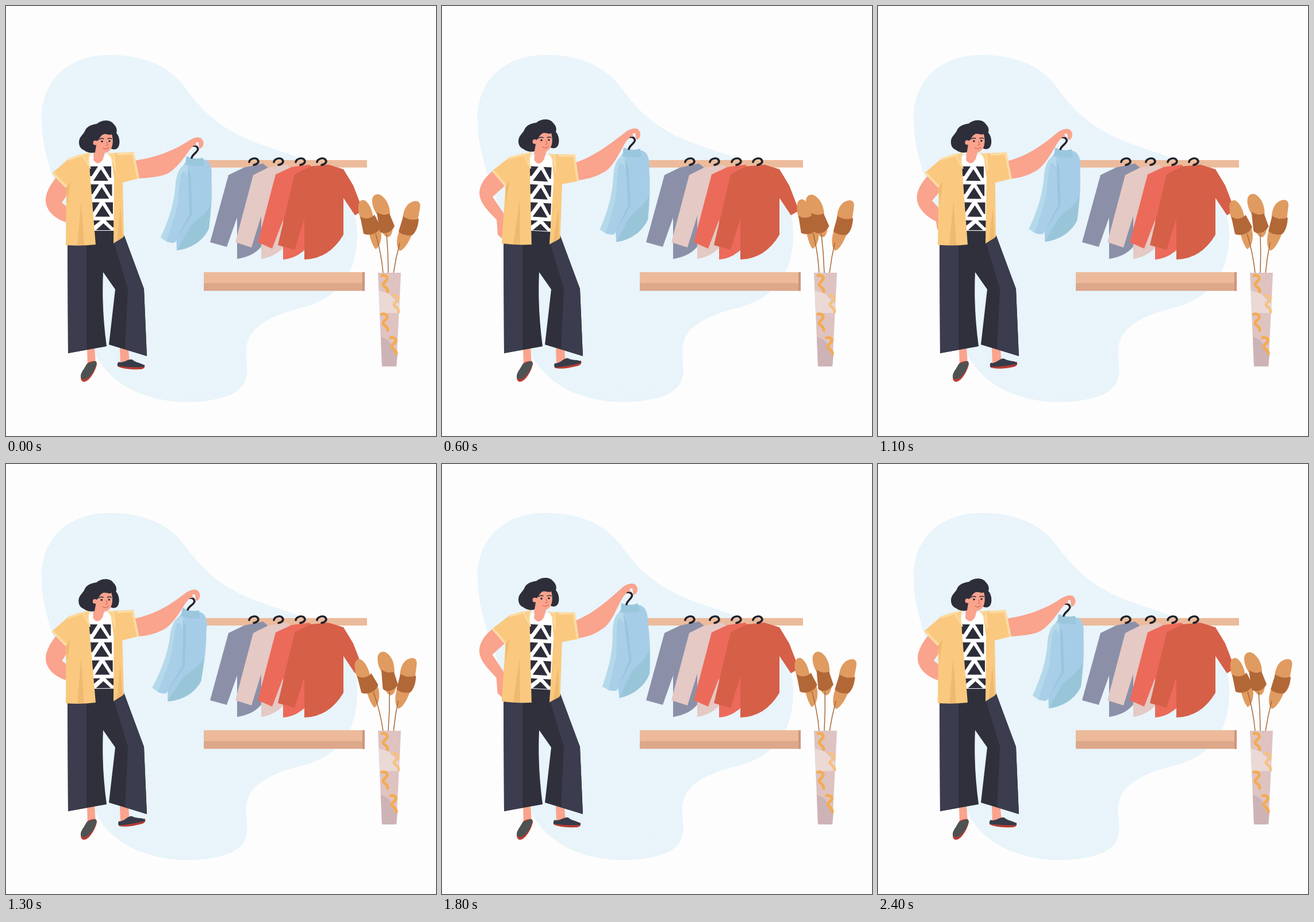
Write an HTML page that moves like this. It is 748x748 px and loops after 2450 ms.

```html
<!DOCTYPE html>
<html lang="en">
<head>
<meta charset="utf-8">
<title>Choosing a shirt</title>
<style>
html, body { margin: 0; width: 100%; height: 100%; overflow: hidden; background: #fdfdfd; }
svg { display: block; width: 100vw; height: 100vh; }
.skin { fill: #faa38d; }
.ink { fill: #2d2e3a; }
.line { fill: none; stroke-linecap: round; stroke-linejoin: round; }
.trim { fill: none; stroke: #fcdca3; stroke-width: 4; }
.fold { fill: #efba6f; }
.leaf { fill: #e09b60; }
.band { fill: #b26737; }
.stem { fill: none; stroke: #a5693a; stroke-width: 1.5; }
</style>
</head>
<body>
<svg viewBox="0 0 748 748">
  <defs>
    <linearGradient id="blob" x1=".25" y1="0" x2=".45" y2="1">
      <stop offset="0" stop-color="#e9f4fb"/><stop offset="1" stop-color="#e8f4fa"/>
    </linearGradient>
    <path id="hook" class="line" stroke="#22232a" stroke-width="3.6" d="M-8 2C-7 -4 2 -6 6 -3C10 1 8 5 0 7"/>
    <path id="curl" class="line" stroke-width="5" d="M-5 -14C0 -16 5 -12 4 -8C3 -4 -3 -2 -3 2C-2 6 5 6 5 14"/>
  </defs>
  <rect width="748" height="748" fill="#fdfdfd"/>
  <path fill="url(#blob)" d="M62 195C62 130 108 85 182 85C240 86 284 104 313 144C372 226 430 235 505 262C570 284 612 335 611 398C610 470 576 508 518 524C466 537 418 556 418 600C418 628 424 642 412 660C398 681 352 689 316 689C235 688 178 655 152 600C125 540 126 450 108 380C92 320 62 265 62 195Z"/>

  <rect x="344" y="268" width="284" height="13" fill="#ecbb9c"/>
  <rect x="344" y="463" width="280" height="19" fill="#ecba9b"/>
  <rect x="344" y="482" width="280" height="13.5" fill="#dda78b"/>
  <path fill="#cc967c" d="M620 463h4v32.5h-4V482Z"/>
  <g id="rack">
    <path fill="#8b90a8" d="M387 294L414 281L428 278L447 274L458 283V400L442 421Q428 436 402 440V368L384 419L355 411Z"/>
    <path fill="#e4c9c4" d="M430 294L456 281L490 276L500 290V400L486 416Q470 436 444 440V365L427 420L399 411Z"/>
    <path fill="#ec6a5a" d="M469 293L497 280L528 276L540 290V400L524 420Q506 439 482 441V372L463 422L438 411Z"/>
    <path fill="#d65f48" d="M502 293L529 279L561 276L587 284L604 312L621 356L607 364L587 334V398Q562 440 519 441V370L502 424L473 416Z"/>
  </g>

  <g id="leaf0">
    <path class="leaf" d="M613 352C612 340 618 336 624 338C632 343 637 355 639 368L618 373Q613 362 613 352ZM631 394L650 384C656 400 652 418 643 423C637 416 634 405 631 394Z"/>
    <path class="band" d="M616 366C625 372 635 370 641 363L652 384C646 398 630 400 622 396Z"/>
    <path class="stem" d="M656 465Q653 430 643 396"/>
  </g>
  <g id="leaf1">
    <path class="leaf" d="M637 341C636 330 643 326 650 328C662 334 668 348 668 363L645 362Q638 352 637 341ZM652 389L673 386C672 397 668 403 663 402Q657 400 652 389Z"/>
    <path class="band" d="M645 359C652 363 660 364 667 361L676 383C669 396 656 398 650 392Z"/>
    <path class="stem" d="M665 465Q665 430 662 396"/>
  </g>
  <g id="leaf2">
    <path class="leaf" d="M708 340C718 337 722 343 720 352L716 374L690 368C692 352 698 343 708 340ZM684 391C679 405 678 420 685 426C693 424 701 410 706 398Z"/>
    <path class="band" d="M691 366C700 372 710 373 718 370C717 385 712 395 706 399C695 400 686 396 683 392Z"/>
    <path class="stem" d="M674 465Q678 438 685 412"/>
  </g>
  <path fill="#dec3c1" d="M647 464H687L679 627H654Z"/>
  <path fill="#ead9d5" d="M648.5 495L666 500L685 520L683.6 534H650.5Z"/>
  <path fill="#ceb3b6" d="M652 575L664 581L681.5 602L679 627H654Z"/>
  <use href="#curl" x="659" y="483" stroke="#f4ab50"/>
  <use href="#curl" x="678" y="518" stroke="#f6c184"/>
  <use href="#curl" x="659" y="550" stroke="#f4ab50"/>
  <use href="#curl" x="674" y="591" stroke="#f4ab50"/>

  <path id="backArm" class="skin"/>
  <path class="skin" d="M141 595H154L156 622L142 628ZM198 595L213 598L215 620L199 622Z"/>
  <path fill="#b93b33" d="M142 621C151 616 159 617 158 623C156 634 146 652 137 653.5C129 655 128 643 134 636Z"/>
  <path fill="#4d5253" d="M141 622C149 621 154 615 157 619C158 629 146 648 137 649C127 650 129 640 135 632Z"/>
  <g id="foot">
    <path fill="#b93b33" d="M195 624H241Q243 632 232 632Q206 633 194 627Z"/>
    <path fill="#373b49" d="M196 619C204 623 215 611 221 616C228 622 241 621 241 628C225 629 208 628 194 626Q193 622 196 619Z"/>
  </g>
  <path fill="#2f303b" d="M107 408L150 387H198L206 400L240 492L245 609L179 589L190 493L169 463Q166 525 175 592L108 604Z"/>
  <path fill="#3b3c4d" d="M107 408H140V598L108 604ZM186 406L205 399L240 492L245 609L207 597L212 492Z"/>

  <g id="held">
    <path fill="#a6cde7" d="M312 272L345 267C357 270 359 285 357.500 302C359 330 357 360 353 387C345 405 325 422 297 425L296 400L300 290Z"/>
    <path fill="#99c5d9" d="M356 346C345 368 328 372 319 386L297 425C325 422 345 405 353 387Z"/>
    <path fill="#b4d9ea" d="M312 276C301 279 297 294 295 308C293 340 286 365 269 403L281 411L294 411L324 362L321 300Q320 280 312 276Z"/>
    <path fill="#a9cfe8" d="M306 288C299 310 302 340 295 360L279 409Q288 414 294 411L319 364L317 305Q316 288 306 288Z"/>
    <path fill="#98c6dc" d="M316 281Q322 290 322 310L324 362L294 411L319 362L317 305Z"/>
    <path fill="#9bc7dd" d="M314 261Q328 268 343 264L345 278Q326 281 312 275Z"/>
    <path class="line" stroke="#22232a" stroke-width="3.5" d="M319 247C322 241 333 242 334 249C333 255 325 257 323 264"/>
  </g>
  <path id="arm" class="skin"/>

  <g id="torso">
    <path fill="#fff" d="M143 262L188 257L191 391H153Z"/>
    <g id="print" class="ink"></g>
    <path class="skin" d="M153 248L173 250L169 266Q161 280 152 268Z"/>
    <path fill="#fac97f" d="M133 258L110 265L80 291L105 316L104 416Q130 418 156 415L145 278ZM182 256L222 254L231 300L203 307L205 401L187 413L188 300Z"/>
    <path class="fold" d="M124 416L131 338L136 416ZM105 316L112 305L107 345ZM193 409L199 350L203 403Z"/>
    <path class="trim" d="M81 290L105 315M109 267L133 259M194 258L221 256L230 300"/>
    <path fill="#fbd08b" stroke="#fcdca3" stroke-width="2" d="M133 259L146 255Q141 270 147 283ZM178 256L188 258L190 286Q188 268 178 256Z"/>
  </g>

  <g id="head">
    <path class="ink" d="M127 237C127 228 134 224 137 218C140 209 150 206 158 205C166 198 181 197 187 205C192 210 194 215 192 221C198 227 199 240 195 246C191 251 185 250 181 247L160 253C152 257 142 256 136 251C129 248 127 243 127 237Z"/>
    <circle class="skin" cx="155.500" cy="238" r="4"/>
    <path class="skin" d="M158 236C163 231 164 225 170 223C177 222 180 226 184 223C187 233 187 249 177 254C167 258 161 254 157 244Z"/>
    <path class="skin" d="M157 242L172 254L170 260H154Z"/>
    <g class="ink"><circle cx="167" cy="235.500" r="1.800"/><circle cx="180" cy="235" r="1.800"/></g>
    <path class="line" stroke="#2d2e3a" stroke-width="1.400" d="M162 232Q166 229 170 231M177 231Q181 229 184 231"/>
    <path class="line" stroke="#d9695c" stroke-width="1.200" d="M175 236L177 242L174 243M169 247Q174 251 179 246"/>
  </g>
</svg>
<script>
const LOOP = 2450, STEP = 50;
const times = [0, 600, 900, 1300, 1800, 2150, 2400, LOOP];
// Values at the first six times; every track returns to its first value.
const tracks = {
  lean:  [0, 1, .5, -.08, .97, .14],
  headX: [0, 6, 1, -.7, 6, .2],
  headY: [0, -2, -2, 1, -1.4, -.4],
  elbow: [0, 1, .8, -.03, 1.05, .15],
  handX: [0, 1.5, -4.5, -6, -3.5, -6],
  handY: [0, -15.5, -19.5, -10, -20.5, -13],
  swing: [0, -1.5, -2.5, 3.2, -4.8, 1],
  foot:  [0, -12, -5, -12, 0, -5],
  leaf0: [0, 2.3, 1.8, -3.2, .4, 1.2],
  leaf1: [0, -1.8, 0, 4.3, 3.5, .5],
  leaf2: [0, -1.8, -3.3, -2.9, .3, .8]
};
const $ = id => document.getElementById(id);
const mix = (a, b, k) => a + (b - a) * k;

// Cubic through the keys, without overshoot.
function sample(track, t) {
  const v = [...track, track[0], track[0]];
  const sec = i => (v[i + 1] - v[i]) / (times[i + 1] - times[i]);
  const slope = i => {
    if (i === 0 || i >= v.length - 1) return 0;
    const a = sec(i - 1), b = sec(i);
    return a * b <= 0 ? 0 : 2 * a * b / (a + b);
  };
  let i = 0;
  while (times[i + 1] <= t) i++;
  const h = times[i + 1] - times[i], u = (t - times[i]) / h, w = 1 - u;
  return w * w * (1 + 2 * u) * v[i] + u * w * w * h * slope(i)
    + u * u * (3 - 2 * u) * v[i + 1] - u * u * w * h * slope(i + 1);
}

const bent = [96,290, 82,302, 69,322, 69,338, 69,352, 80,368, 104,376, 106,384, 114,386, 112,354, 97,342, 108,326, 120,300];
const wide = [92,284, 76,296, 65,310, 65,326, 66,344, 82,358, 95,372, 97,398, 106,406, 108,362, 88,332, 110,312, 120,296];
function backArm(k) {
  const p = bent.map((n, i) => mix(n, wide[i], k).toFixed(2));
  return `M${p.slice(0, 2)}C${p.slice(2, 8)} ${p.slice(8, 14)}L${p.slice(14)}Z`;
}

function frontArm(lean, hx, hy) {
  const at = (x, y, hand, body = 0) =>
    `${(x + hx * hand + 7 * body * lean).toFixed(2)} ${(y + hy * hand + 3 * body * lean).toFixed(2)} `;
  return 'M' + at(214, 272, 0, 1) + 'L' + at(229, 268, 0, 1)
    + 'C' + at(266, 262, .25, .3) + at(295, 250, .8) + at(320, 233, 1)
    + 'C' + at(330, 228, 1) + at(340, 225, 1) + at(343.5, 237, 1)
    + 'Q' + at(344, 247, 1) + at(336, 248, 1) + 'L' + at(335, 237, 1)
    + at(330, 237, 1) + at(331, 243, 1) + at(326, 243, 1) + at(319, 251, 1)
    + 'C' + at(306, 269, .9) + at(291, 291, .6, .8) + at(271, 295, .4, .8)
    + 'Q' + at(255, 299, .1, .9) + at(231, 300, 0, 1) + 'L' + at(214, 296, 0, 1) + 'Z';
}

function buildPrint() {
  let d = '';
  for (let row = 0; row < 4; row++) {
    const x = 145 + row * 1.5, y = 279 + row * 31.3, h = row < 3 ? 25 : 17;
    d += `M${x + 7} ${y + h}h26l-13 -${h - 5}Z`;
    d += `M${x} ${y}h15l-11 ${h - 8}h-3ZM${x + 24} ${y}h14v${h - 5}h-2Z`;
  }
  $('print').innerHTML = `<path d="${d}"/>`;
}

function buildHooks() {
  $('rack').insertAdjacentHTML('beforeend',
    [431, 474, 512, 549].map(x => `<use href="#hook" x="${x}" y="269.500"/>`).join(''));
}

const turn = (id, a, x, y, move = '') =>
  $(id).setAttribute('transform', `${move} rotate(${a} ${x} ${y})`);

function draw(t) {
  const s = {};
  for (const k in tracks) s[k] = sample(tracks[k], t);
  turn('torso', s.lean * 3.3, 156, 412);
  $('head').setAttribute('transform', `translate(${s.headX} ${s.headY})`);
  $('backArm').setAttribute('d', backArm(s.elbow));
  $('arm').setAttribute('d', frontArm(s.lean, s.handX, s.handY));
  turn('held', s.swing, 333, 247, `translate(${s.handX} ${s.handY})`);
  turn('foot', s.foot, 207, 618);
  [656, 665, 674].forEach((x, i) => turn('leaf' + i, s['leaf' + i], x, 464));
}

buildPrint();
buildHooks();
const start = performance.now();
function tick() {
  const t = (performance.now() - start) % LOOP;
  draw(Math.floor(t / STEP) * STEP);
  requestAnimationFrame(tick);
}
tick();
</script>
</body>
</html>
```
